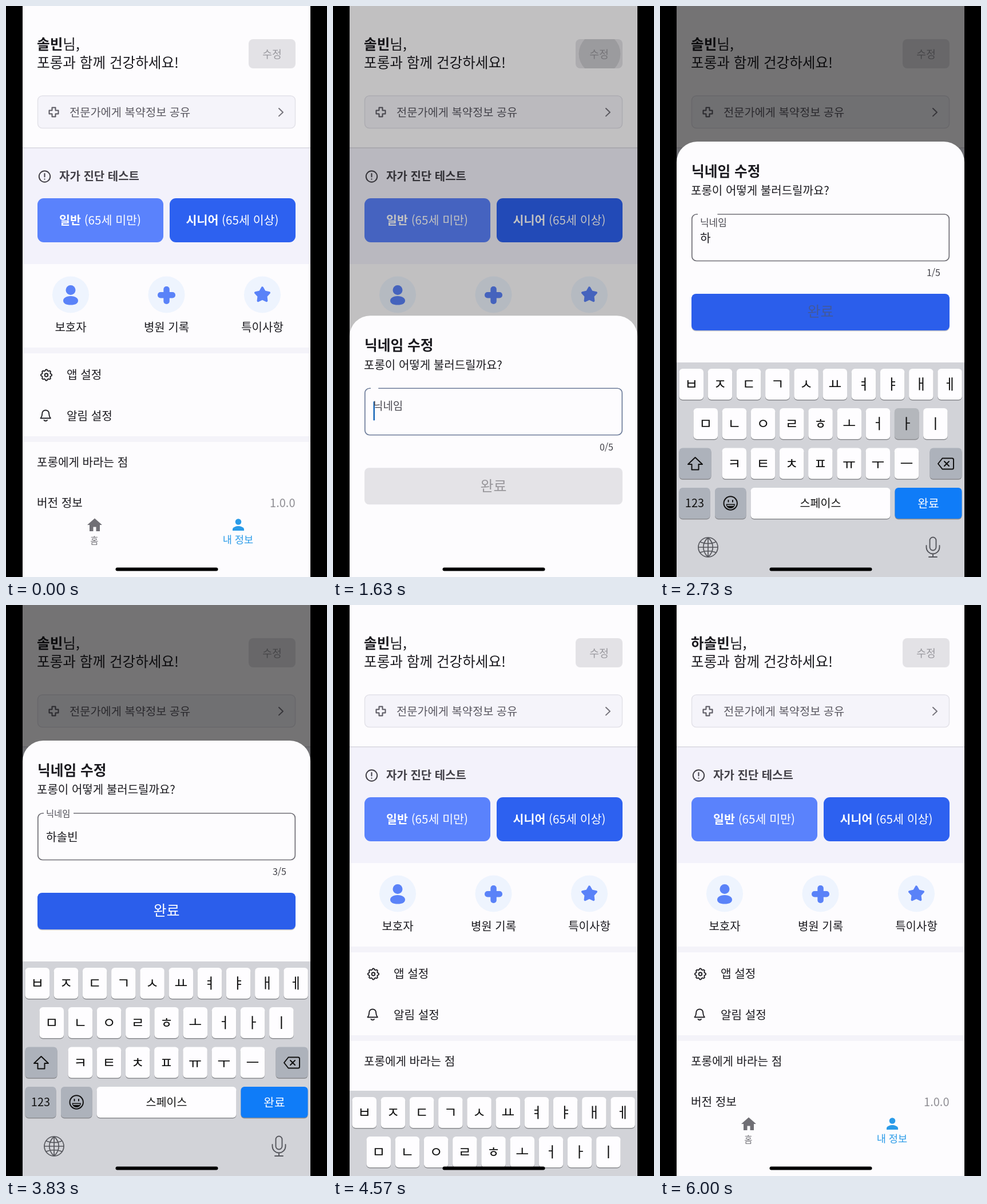
Write an HTML page that moves like this. It is 561x998 px and loops after 6030 ms.

```html
<!DOCTYPE html>
<html lang="ko">
<head>
<meta charset="utf-8">
<title>닉네임 수정</title>
<style>
  html, body { margin: 0; width: 100%; height: 100%; overflow: hidden; background: #000; }
  svg { display: block; width: 100vw; height: 100vh; }
  text { font-family: "Noto Sans CJK KR", "Noto Sans CJK", "Noto Sans KR", sans-serif; white-space: pre; }
  .line { fill: none; stroke-linecap: round; stroke-linejoin: round; }
</style>
</head>
<body>
<svg viewBox="0 0 561 998" xmlns="http://www.w3.org/2000/svg">
  <defs>
    <clipPath id="editClip"><rect x="424" y="58" width="82" height="51" rx="8"/></clipPath>
    <clipPath id="doneClip"><rect x="55" y="266" width="451" height="64" rx="8"/></clipPath>
  </defs>
  <rect width="561" height="998"/>
  <g id="page">
    <rect x="29" width="503" height="998" fill="#fdfcfe"/>
    <rect x="29" y="248" width="503" height="203" fill="#f3f2fb"/>
    <rect x="29" y="247" width="503" height="2" fill="#dfdee6"/>
    <rect x="29" y="597" width="503" height="10" fill="#f4f3f9"/>
    <rect x="29" y="752" width="503" height="10" fill="#f4f3f9"/>
    <rect x="424" y="58" width="82" height="51" rx="8" fill="#e3e2e6"/>
    <g clip-path="url(#editClip)"><circle id="editInk" cx="466" cy="83.5" r="0"/></g>
    <rect x="55.5" y="157" width="450" height="56.5" rx="8" fill="#f5f4fa" stroke="#e3e2e9" stroke-width="1.5"/>
    <g class="line" stroke="#5b5962" stroke-width="2">
      <path d="M80.5 177.5h6v5h5v6h-5v5h-6v-5h-5v-6h5z"/>
      <path d="M477 179l7 6.700-7 6.700" stroke="#77757d"/>
      <circle cx="67.500" cy="298" r="9.700" stroke="#434148"/>
      <path d="M67.500 293v5.500m0 4v.2" stroke="#434148"/>
    </g>
    <rect x="55" y="336" width="220" height="77" rx="11" fill="#5a82fc"/>
    <rect x="286" y="336" width="220" height="77" rx="11" fill="#2d61f0"/>
    <g fill="#eef4fe">
      <circle cx="113" cy="504.500" r="32"/><circle cx="280.500" cy="504.500" r="32"/><circle cx="448" cy="504.500" r="32"/>
    </g>
    <g fill="#5a82f8">
      <circle cx="113" cy="496.500" r="8.500"/>
      <path d="M100 515c0-5 6-8 13-8s13 3 13 8-5 7.500-13 7.500-13-2.500-13-7.500z"/>
      <rect x="265" y="500" width="31" height="10.500" rx="5"/>
      <rect x="275.300" y="490" width="10.500" height="31" rx="5"/>
      <path id="star" stroke="#5a82f8" stroke-width="4" stroke-linejoin="round"/>
    </g>
    <g class="line" stroke="#222126" stroke-width="1.900">
      <path id="gear"/>
      <circle cx="70.500" cy="645" r="2.800"/>
      <path d="M60.500 720.500c2-2.500 2.700-4 2.700-7.500 0-4 2.500-6.500 6-6.500s6 2.500 6 6.500c0 3.500 .7 5 2.700 7.500zM66.500 724c1 1.600 4.500 1.600 5.500 0"/>
    </g>
    <path d="M155 895.500l-13 11.500h4v11h6.500v-7.500h5v7.500h6.500v-11h4z" fill="#706f75"/>
    <g fill="#2a9be8"><circle cx="406" cy="901.500" r="5.300"/>
      <path d="M396 917v-2.500c0-3.600 6.500-5.500 10-5.500s10 1.900 10 5.500v2.500z"/></g>
  </g>
  <rect id="dim" x="29" width="503" height="998"/>
  <g id="sheet">
    <path d="M29 800V36a36 36 0 0 1 36-36H496a36 36 0 0 1 36 36V800z" fill="#fdfcfe"/>
    <rect id="field" x="55.800" y="127" width="449.500" height="81.500" rx="8" fill="none" stroke-width="1.700"/>
    <path id="gap" stroke="#fdfcfe" stroke-width="4"/>
    <rect id="caret" x="70.500" y="150" width="2.500" height="33" fill="#1766b8"/>
    <rect x="55" y="267.500" width="451" height="64" rx="8" id="doneShade" fill="#000" opacity="0"/>
    <rect id="done" x="55" y="266" width="451" height="64" rx="8"/>
    <g clip-path="url(#doneClip)"><circle id="doneInk" cx="281" cy="298" r="0" fill="#fff"/></g>
  </g>
  <g id="keys"><rect x="29" width="503" height="400" fill="#d2d3d8"/></g>
  <rect x="191.500" y="981.500" width="179" height="6" rx="3"/>
  <rect width="29" height="998"/><rect x="532" width="29" height="998"/>
</svg>
<script>
const LOOP = 6030;
const $ = id => document.getElementById(id);
const OLD_NAME = '솔빈', NEW_NAME = '하솔빈';

function add(parent, tag, attrs) {
  const el = document.createElementNS('http://www.w3.org/2000/svg', tag);
  for (const k in attrs) el.setAttribute(k, attrs[k]);
  return parent.appendChild(el);
}

// y is the vertical middle of the glyphs
function label(parent, str, x, y, size, fill, more = {}) {
  const el = add(parent, 'text', { x, y: y + size * 0.37, 'font-size': size, fill, ...more });
  el.textContent = str;
  return el;
}
const MID = { 'text-anchor': 'middle' }, END = { 'text-anchor': 'end' };

// two runs in one line, the first one bold
function pair(x, y, size, fill, a, b, more) {
  const el = label(page, '', x, y, size, fill, more);
  const bold = add(el, 'tspan', { 'font-weight': 700 });
  bold.textContent = a;
  add(el, 'tspan', { 'font-weight': 300 }).textContent = b;
  return bold;
}

const page = $('page'), sheet = $('sheet'), keys = $('keys');
const INK = '#1b1a1f';

const userName = pair(54, 67, 24.6, INK, OLD_NAME, '님,');
label(page, '포롱과 함께 건강하세요!', 54, 98.5, 24.6, INK, { 'font-weight': 350 });
label(page, '수정', 465, 84, 18.3, '#99989e', MID);
label(page, '전문가에게 복약정보 공유', 111, 185.5, 19.8, '#5b5962');
label(page, '자가 진단 테스트', 93, 298, 20, '#434148', { 'font-weight': 700 });
pair(164.5, 374, 20.6, '#fff', '일반', ' (65세 미만)', MID);
pair(395.5, 374, 20.6, '#fff', '시니어', ' (65세 이상)', MID);
['보호자', '병원 기록', '특이사항'].forEach((s, i) => label(page, s, 113 + i * 167.5, 562, 20, INK, MID));
label(page, '앱 설정', 106, 644.5, 20.2, INK);
label(page, '알림 설정', 106, 716.5, 20.2, INK);
label(page, '포롱에게 바라는 점', 54, 798, 20.1, INK);
label(page, '버전 정보', 54, 869, 20.2, INK);
label(page, '1.0.0', 505.5, 869, 20, '#8e8d93', END);
label(page, '홈', 154.5, 934.5, 15.5, '#77767c', MID);
label(page, '내 정보', 405.5, 932.5, 17.6, '#2a9be8', MID);

function polar(cx, cy, n, radius, start) {
  let d = '';
  for (let i = 0; i < n; i++) {
    const a = start + i / n * Math.PI * 2, r = radius(i, a);
    d += (i ? 'L' : 'M') + (cx + r * Math.cos(a)).toFixed(2) + ' ' + (cy + r * Math.sin(a)).toFixed(2);
  }
  return d + 'z';
}
$('star').setAttribute('d', polar(448, 505, 10, i => i % 2 ? 6.8 : 12.6, -Math.PI / 2));
$('gear').setAttribute('d', polar(70.5, 645, 96, (i, a) => 8.6 + Math.tanh(2.2 * Math.cos(8 * a)) * 0.95, 0));

label(sheet, '닉네임 수정', 55, 52, 24.7, INK, { 'font-weight': 700 });
label(sheet, '포롱이 어떻게 불러드릴까요?', 54, 86, 20.05, INK);
const hint = label(sheet, '닉네임', 70, 168.5, 20.2, '#4b4a52');
const typed = label(sheet, '', 70, 168.5, 20.2, INK);
const counter = label(sheet, '0/5', 490, 229.5, 16, '#3f3e45', END);
const doneText = label(sheet, '완료', 280.5, 297, 25, '#a09fa5', MID);

// keyboard
const keyCaps = {};
function key(x, y, w, fill, str, size = 25, textFill = '#111') {
  add(keys, 'rect', { x, y: y + 1.5, width: w, height: 54, rx: 6, fill: '#8b8c90' });
  const cap = add(keys, 'rect', { x, y, width: w, height: 54, rx: 6, fill });
  if (str) label(keys, str, x + w / 2, y + 27, size, textFill, MID);
  return cap;
}
[['ㅂㅈㄷㄱㅅㅛㅕㅑㅐㅔ', 33.5, 11], ['ㅁㄴㅇㄹㅎㅗㅓㅏㅣ', 58.5, 80], ['ㅋㅌㅊㅍㅠㅜㅡ', 108.5, 149.5]]
  .forEach(([row, x, y]) => [...row].forEach((c, i) => { keyCaps[c] = key(x + i * 50.2, y, 42.5, '#fefdff', c); }));
const GREY = '#adb2bb';
key(33.5, 149.5, 56, GREY);
key(471.5, 149.5, 56, GREY);
key(33.5, 219, 54, GREY, '123', 20);
key(96, 219, 54.5, GREY);
key(158.5, 219, 244, '#fefdff', '스페이스', 19.5);
key(410.5, 219, 117, '#0f7cf8', '완료', 20.3, '#fff');

const glyph = (d, stroke, w) => add(keys, 'path', { d, stroke, 'stroke-width': w, class: 'line' });
glyph('M61.500 166l-12.500 12h6.500v9.500h12v-9.500h6.500z', '#111', 2);
glyph('M486 177l7.500-9.500h17q2.500 0 2.500 2.500v14q0 2.500-2.500 2.500h-17zM497 173l8 8m0-8l-8 8', '#111', 2);
glyph('M111.500 246a11.700 11.700 0 1 0 23.400 0a11.700 11.700 0 1 0-23.400 0M119.500 241v2.500m7.500-2.500v2.500', '#111', 2);
add(keys, 'path', { d: 'M115.500 247.500h15.500c0 10-15.500 10-15.500 0z', fill: '#111' });
glyph('M118 249.800h10.500', GREY, 1.800);
glyph('M67 323a17 17 0 1 0 34 0a17 17 0 1 0-34 0M67 323h34M84 306v34M84 306c-11 10-11 24 0 34M84 306c11 10 11 24 0 34M70 313.500c8 4 20 4 28 0M70 332.500c8-4 20-4 28 0', '#55565c', 1.7);
glyph('M471.500 311a5.500 5.500 0 0 1 11 0v12a5.500 5.500 0 0 1-11 0zM465.500 320v3a11.500 11.500 0 0 0 23 0v-3M477 334.500v5.500M470 340h14', '#55565c', 1.9);

// key, press time, resulting text
const STROKES = [
  ['ㅎ', 2640, 'ㅎ'], ['ㅏ', 2715, '하'], ['ㅅ', 2880, '핫'], ['ㅗ', 3010, '하소'],
  ['ㄹ', 3160, '하솔'], ['ㅂ', 3330, '하솗'], ['ㅣ', 3470, '하솔비'], ['ㄴ', 3640, '하솔빈']
];
const HOLD = 90;

const clamp = v => Math.max(0, Math.min(1, v));
const span = (t, a, b) => clamp((t - a) / (b - a));
const mix = (a, b, p) => a + (b - a) * p;
const rgba = (a, b, p) => `rgba(${a.map((v, i) => mix(v, b[i], p).toFixed(3)).join()})`;

function bezier(x1, y1, x2, y2) {
  const f = (a, b, s) => 3 * (1 - s) * (1 - s) * s * a + 3 * (1 - s) * s * s * b + s * s * s;
  return x => {
    let lo = 0, hi = 1;
    for (let i = 0; i < 24; i++) {
      const s = (lo + hi) / 2;
      if (f(x1, x2, s) < x) lo = s; else hi = s;
    }
    return x >= 1 ? 1 : x <= 0 ? 0 : f(y1, y2, lo);
  };
}
const ease = bezier(.25, .1, .25, 1);
const decel = bezier(0, 0, .2, 1);
const standard = bezier(.4, 0, .2, 1);
const spring = (ms, w) => { const x = Math.max(0, ms) / 1000 * w; return 1 - (1 + x) * Math.exp(-x); };

function set(el, attrs) { for (const k in attrs) el.setAttribute(k, attrs[k]); }
function setText(el, s) { if (el.textContent !== s) el.textContent = s; }

function render(t) {
  // sheet and scrim share one route progress
  const route = t < 4000 ? span(t, 1564.5, 1814.5) : 1 - span(t, 4000, 4200);
  set(sheet, { transform: `translate(0 ${998 - 761 * decel(route)})` });
  set($('dim'), { opacity: 0.54 * ease(route) });

  const shown = t < 4300 ? spring(t - 1640, 25) : 1 - spring(t - 4444, 16);
  set(keys, { transform: `translate(0 ${998 - 375 * shown})` });

  const press = span(t, 1540, 1765);
  set($('editInk'), { r: press && mix(14, 50, standard(press)), opacity: 0.1 * (1 - span(t, 1650, 1850)) });

  // floating label: brief lift on focus, then for good once text exists
  const focus = standard(span(t, 1588, 1755)) * (1 - span(t, 1660, 1800));
  const lift = t < 2400 ? focus : standard(span(t, 2660, 2827));
  const size = mix(20.2, 15.3, lift);
  set(hint, { 'font-size': size, y: mix(168.5, 127.5, lift) + size * 0.37 });
  set($('gap'), { d: lift > 0.01 ? `M66 127h${52 * lift}` : '' });
  set($('field'), { stroke: rgba([112, 111, 118, 1], [108, 138, 190, 1], clamp(focus * 2)) });

  let text = '';
  for (const [, at, s] of STROKES) if (t >= at + 10) text = s;
  setText(typed, text);
  setText(counter, text.length + '/5');
  set(hint, { opacity: text || lift || t < 2640 ? 1 : 0 });
  const blinkOn = t < 2100 || (t >= 2500 && t < 2640);
  set($('caret'), { opacity: blinkOn ? 1 : 0 });

  for (const c in keyCaps) {
    const down = STROKES.some(([k, at]) => k === c && t >= at && t < at + HOLD);
    set(keyCaps[c], { fill: down ? '#b4b7bc' : '#fefdff' });
  }

  const on = span(t, 2645, 2725);
  set($('done'), { fill: rgba([228, 227, 231, 1], [43, 94, 235, 1], on) });
  set($('doneShade'), { opacity: 0.2 * on });
  set(doneText, { fill: rgba([28, 27, 31, .38], [255, 255, 255, 1], span(t, 2680, 2880)) });
  const tap = span(t, 3880, 4105);
  set($('doneInk'), { r: tap && mix(30, 230, standard(tap)), opacity: 0.12 * (1 - span(t, 4030, 4200)) });

  setText(userName, t < 5000 ? OLD_NAME : NEW_NAME);
}

const start = performance.now();
function tick() {
  render((performance.now() - start) % LOOP);
  requestAnimationFrame(tick);
}
tick();
</script>
</body>
</html>
```
